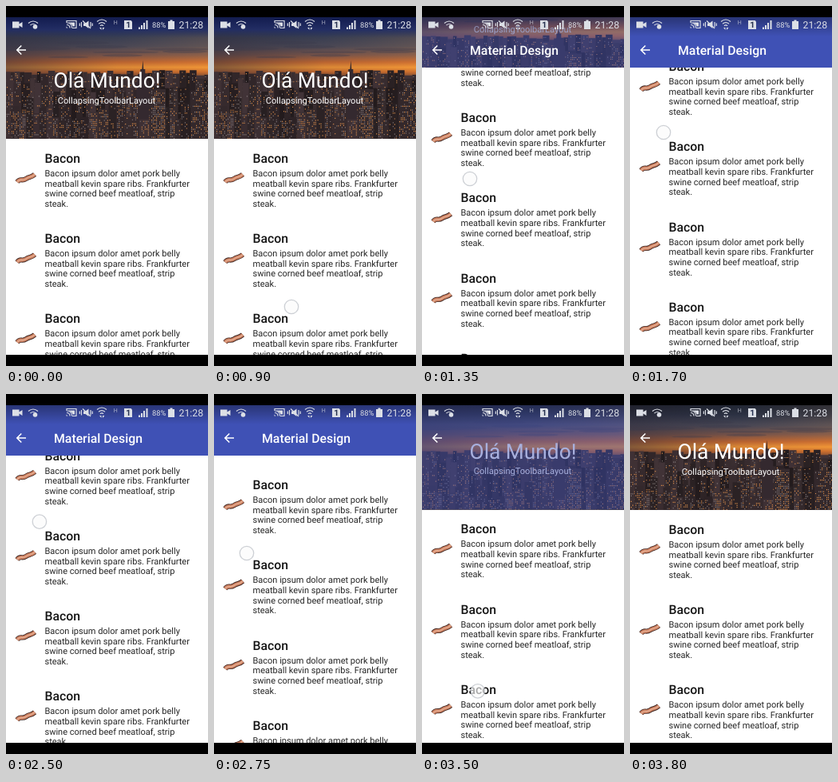
An HTML page for the animation above (3.85 s loop, 253 px wide and 450 px high).

```html
<!DOCTYPE html>
<html lang="pt">
<head>
<meta charset="utf-8">
<title>Collapsing toolbar</title>
<style>
  html, body { margin: 0; width: 100%; height: 100%; overflow: hidden; background: #000; }
  svg { display: block; width: 100%; height: 100%; font-family: Roboto, sans-serif; text-rendering: geometricPrecision; }
  .name { font-size: 15.8px; font-weight: 500; fill: #161616; }
  .body { font-size: 11px; fill: #252525; }
  .line { fill: none; stroke: #dcdfe6; stroke-width: 1.2; }
</style>
</head>
<body>
<svg viewBox="0 0 253 450">
  <defs>
    <linearGradient id="sky" x2="0" y2="1">
      <stop offset="0" stop-color="#333c50"/>
      <stop offset=".2" stop-color="#363e54"/>
      <stop offset=".33" stop-color="#4c4a57"/>
      <stop offset=".43" stop-color="#80584a"/>
      <stop offset=".51" stop-color="#c8692f"/>
      <stop offset=".57" stop-color="#f09535"/>
      <stop offset=".62" stop-color="#c96a2c"/>
      <stop offset=".7" stop-color="#4a3335"/>
      <stop offset="1" stop-color="#2a272e"/>
    </linearGradient>
    <linearGradient id="dusk">
      <stop offset="0" stop-color="#2d2a3a" stop-opacity=".55"/>
      <stop offset=".55" stop-color="#2d2a3a" stop-opacity=".1"/>
      <stop offset="1" stop-color="#f09a40" stop-opacity=".12"/>
    </linearGradient>
    <linearGradient id="blue" x2="0" y2="1">
      <stop offset="0" stop-color="#1d2b78"/>
      <stop offset=".6" stop-color="#263478" stop-opacity=".85"/>
      <stop offset="1" stop-color="#2c3660" stop-opacity="0"/>
    </linearGradient>
    <linearGradient id="shade" x2="0" y2="1">
      <stop offset="0" stop-opacity=".35"/>
      <stop offset="1" stop-opacity="0"/>
    </linearGradient>
    <clipPath id="clip"><rect id="clipBox" y="14" width="253"/></clipPath>
    <path id="strip" d="M14 54C18 48.500 20 53.500 25 50S31 49 36 44.500" fill="none"/>
    <g id="row">
      <use href="#strip" stroke="#3a2420" stroke-width="6.200"/>
      <use href="#strip" stroke="#cc8061" stroke-width="4.600"/>
      <use href="#strip" stroke="#e8b398" stroke-width="1.300"/>
      <text class="name" x="48.500" y="30">Bacon</text>
      <g class="body">
        <text x="48.500" y="47">Bacon ipsum dolor amet pork belly</text>
        <text x="48.500" y="59.700">meatball kevin spare ribs. Frankfurter</text>
        <text x="48.500" y="72.300">swine corned beef meatloaf, strip</text>
        <text x="48.500" y="85">steak.</text>
      </g>
    </g>
  </defs>

  <rect y="14" width="253" height="422" fill="#fff"/>
  <g id="list"></g>

  <g clip-path="url(#clip)">
    <g id="photo">
      <rect y="14" width="253" height="110" fill="url(#sky)"/>
      <rect y="14" width="253" height="110" fill="url(#dusk)"/>
      <g id="city"></g>
    </g>
    <g id="heading" fill="#fff" text-anchor="middle">
      <text x="126.500" y="102.300" font-size="26.300">Olá Mundo!</text>
      <text x="126" y="121.500" font-size="11.070">CollapsingToolbarLayout</text>
    </g>
    <rect id="scrim" y="14" width="253" height="152" fill="#3f51b5"/>
    <rect id="top" y="14" width="253" height="26" fill="url(#blue)"/>
    <rect y="14" width="253" height="24" fill="url(#shade)"/>
  </g>

  <path d="M25 55H14M19.300 49.500L13.800 55L19.300 60.500" fill="none" stroke="#fff" stroke-width="1.600"/>
  <text id="bar" x="60" y="60.500" font-size="15.800" font-weight="500" fill="#fff">Material Design</text>

  <g fill="#dcdfe6">
    <path d="M8 19.500h8.500v3l4-2.500v7l-4-2.500v3H8z"/>
    <path class="line" d="M28 21.500q6-5 12 0M30.500 24q3.500-3 7 0"/>
    <circle cx="36.500" cy="26" r="2.800"/>
    <path class="line" d="M76 21v-2.500h12v9h-5M76 23.500q4 0 4 4M76 21q6.500 0 6.500 6.500"/>
    <path d="M78 20.500h8v5h-2.500q-1-4-5.500-4.500zM75.500 25.500l2 2h-2z"/>
    <path d="M97 21.500h2.500l4-3v9.500l-4-3H97z"/>
    <path class="line" d="M96 18.500l10 9.500M94.500 20v6.500M92.300 21.500v3.500M106 20v6.500M108.200 21.500v3.500"/>
    <path class="line" d="M114 19.500q6-5 12 0M116 22.200q4-3.300 8 0M118 24.800q2-1.800 4 0"/>
    <path d="M117 27h2.500v3zM121 30l2.500-3H121z"/>
    <text x="134.800" y="22.500" font-size="7" opacity=".7">H</text>
    <path d="M148 18h8.500l1.500 1.500V29H148z"/>
    <text x="150.300" y="27.300" font-size="10.500" font-weight="700" fill="#26304f">1</text>
    <path d="M166 26.500h2V29h-2zM169 24h2v5h-2zM172 21h2v8h-2zM175.500 18h2v11h-2z"/>
    <text x="183" y="27.300" font-size="9.300">88%</text>
    <path d="M205.500 17.500h3V19h2.500v10h-8V19h2.500z"/>
    <text x="216.500" y="28" font-size="12.300">21:28</text>
  </g>

  <circle id="touch" r="8.700" fill="#fafafa" fill-opacity=".65" stroke="#c0c4ca" stroke-opacity=".8" stroke-width="1.300"/>
  <path d="M0 0H253V14H0zM0 436H253V450H0z"/>
</svg>

<script>
const $ = id => document.getElementById(id);
const clamp = v => Math.max(0, Math.min(1, v));
const shift = (id, y) => $(id).setAttribute("transform", `translate(0 ${y})`);

let seed = 11;
const rnd = (a, b) => {
  seed = (seed * 16807) % 2147483647;
  return a + (b - a) * seed / 2147483647;
};

// A building with some warm and some pale windows.
function building(x, y, w, light, lit) {
  let warm = "", pale = "";
  for (let wy = y + 2; wy < 165; wy += 2.4)
    for (let wx = x + 1; wx < x + w - 1; wx += 2)
      if (rnd(0, 1) < lit) {
        const pane = `M${wx} ${wy}h1.1v1.2h-1.1z`;
        if (rnd(0, 1) < .55) warm += pane; else pale += pane;
      }
  return `<path d="M${x} 168V${y}h${w}V168z" fill="hsl(345 12% ${light}%)"/>` +
    `<path d="${warm}" fill="#d98d4c"/><path d="${pale}" fill="#857b7c"/>`;
}

function skyline(top, low, wide, light, lit) {
  let out = "";
  for (let x = -4; x < 253;) {
    const w = rnd(wide * .6, wide * 1.4);
    out += building(x, rnd(top, low), w, rnd(light - 5, light + 6), rnd(lit * .3, lit * 1.7));
    x += w;
  }
  return out;
}

// Dark clouds, three rows of houses and the taller towers.
let scene = "";
for (let i = 0; i < 9; i++)
  scene += `<ellipse cx="${rnd(0, 253)}" cy="${rnd(44, 69)}" rx="${rnd(25, 60)}" ry="${rnd(1, 2.5)}" fill="#3b3a4a" opacity=".35"/>`;
scene += skyline(80, 87, 7, 17, .16) + skyline(89, 108, 8, 17, .3) +
  `<path d="M171.500 68l.8 11h2v6h3v9h2v72h-16V94h2v-9h3v-6h2z" fill="#34292f"/>` +
  building(88, 84, 8, 16, .3) + skyline(112, 143, 10, 16, .36) +
  building(181, 104, 19, 19, .6) + building(231, 106, 24, 18, .45);
$("city").innerHTML = scene;

for (let i = 0; i < 6; i++)
  $("list").innerHTML += `<use href="#row" y="${i * 100.2}"/>`;

// time, scroll distance, touch x, touch y
const keys = [
  [900, 0, 97, 376], [1350, 151, 60, 216], [1700, 215, 42, 158],
  [2450, 215, 42, 158], [2750, 177, 41, 199], [3150, 47, 63, 341], [3550, 21, 70, 372]
];

// Smooth curve through the keys that never overshoots.
function track(col, t) {
  const last = keys.length - 1;
  if (t <= keys[0][0]) return keys[0][col];
  if (t >= keys[last][0]) return keys[last][col];
  const rate = i => (keys[i + 1][col] - keys[i][col]) / (keys[i + 1][0] - keys[i][0]);
  const slope = i => {
    if (i === 0 || i === last) return 0;
    const a = rate(i - 1), b = rate(i);
    return a * b > 0 ? 2 * a * b / (a + b) : 0;
  };
  const i = keys.findIndex(k => k[0] > t) - 1;
  const a = keys[i], b = keys[i + 1], d = b[0] - a[0], u = (t - a[0]) / d, v = 1 - u;
  return a[col] * v * v * (1 + 2 * u) + b[col] * u * u * (3 - 2 * u) +
    d * u * v * (v * slope(i) - u * slope(i + 1));
}

const LOOP = 3850, STEP = 50, RANGE = 89, FADE = 600;

function draw(now) {
  const t = Math.floor(now % LOOP / STEP) * STEP;
  const scroll = track(1, t), fold = Math.min(scroll, RANGE);
  shift("list", 166 - scroll);
  shift("photo", -fold / 2);
  shift("heading", -fold);
  $("clipBox").setAttribute("height", 152 - fold);
  $("scrim").setAttribute("opacity", clamp((t - 1080) / FADE) - clamp((t - 3170) / FADE));
  $("top").setAttribute("opacity", clamp(1 - fold / 20));
  $("bar").setAttribute("opacity", fold >= RANGE ? 1 : 0);
  const touch = $("touch");
  touch.setAttribute("cx", track(2, t));
  touch.setAttribute("cy", track(3, t));
  touch.setAttribute("opacity", t >= 900 && t < 3650 ? 1 : 0);
}

const start = performance.now();
(function tick() {
  draw(performance.now() - start);
  requestAnimationFrame(tick);
})();
</script>
</body>
</html>
```
